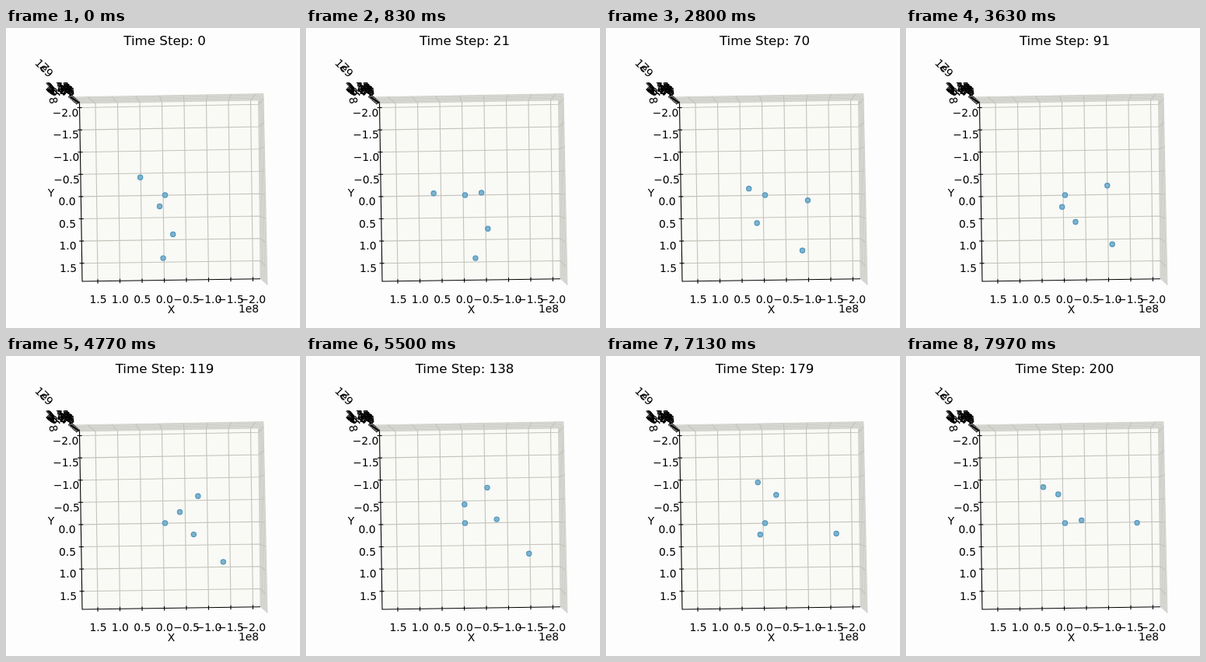
Write an HTML page with a canvas that moves like this. It is 378 px wide and 386 px high and loops after 8 s.

```html
<!DOCTYPE html>
<html lang="en">
<head>
<meta charset="utf-8">
<title>Orbits</title>
<style>
  html, body { margin: 0; width: 100%; height: 100%; overflow: hidden; background: #fdfdfd; }
  canvas { display: block; }
</style>
</head>
<body>
<canvas id="stage" width="378" height="386"></canvas>
<script>
const ctx = document.getElementById('stage').getContext('2d');
const LOOP = 8000, LAST_FRAME = 239, LAST_STEP = 200;
const RAD = Math.PI / 180, GM = 0.0002959122;   // AU^3 / day^2
const TILT = 23.44 * RAD;
const GRID = '#c3c3ba', WALL = '#e2e2de', WALL_LINE = '#c6c6c0';

// Orbital elements at step 0; angles in degrees, lengths in AU.
const planets = [
  { a: 0.3871, e: 0.2056, i: 7.005, L: 69.94, peri: 77.49, node: 48.33 },
  { a: 0.7233, e: 0.0068, i: 3.395, L: 320.68, peri: 131.6, node: 76.68 },
  { a: 1, e: 0.0167, i: 0, L: 100.07, peri: 103, node: 0 },
  { a: 1.5237, e: 0.0934, i: 1.85, L: 77.59, peri: -23.9, node: 49.56 }
];

function keplerPosition({ a, e, i, L, peri, node }, day) {
  const M = (L - peri) * RAD + Math.sqrt(GM / a ** 3) * day;
  let E = M;
  for (let k = 0; k < 20; k++) E = M + e * Math.sin(E);
  const nu = Math.atan2(Math.sqrt(1 - e * e) * Math.sin(E), Math.cos(E) - e);
  const r = a * (1 - e * Math.cos(E));
  const u = nu + (peri - node) * RAD, n = node * RAD, inc = i * RAD;
  const c = Math.cos(u), s = Math.sin(u) * Math.cos(inc);
  return [
    r * (Math.cos(n) * c - Math.sin(n) * s),
    r * (Math.sin(n) * c + Math.cos(n) * s),
    r * Math.sin(u) * Math.sin(inc)
  ];
}

function project([x, y, z]) {
  const right = -x * 56.3;
  const down = (y * Math.cos(TILT) - z * Math.sin(TILT)) * 57;
  return [204.5 + right + 0.012 * down, 215 + down - 0.016 * right];
}

// One day per step: update velocity, then position.
function simulate(planet) {
  const h = 0.01;
  const pos = keplerPosition(planet, 0);
  const before = keplerPosition(planet, -h), after = keplerPosition(planet, h);
  const vel = pos.map((_, k) => (after[k] - before[k]) / (2 * h));
  const path = [];
  for (let step = 0; step <= LAST_STEP; step++) {
    path.push(project(pos));
    const pull = GM / Math.hypot(...pos) ** 3;
    for (let k = 0; k < 3; k++) vel[k] -= pull * pos[k];
    for (let k = 0; k < 3; k++) pos[k] += vel[k];
  }
  return path;
}
const paths = planets.map(simulate);

function polygon(fill, ...points) {
  ctx.beginPath();
  points.forEach(p => ctx.lineTo(...p));
  ctx.closePath();
  ctx.fillStyle = fill;
  ctx.fill();
}

function line(color, width, ...points) {
  ctx.beginPath();
  points.forEach(p => ctx.lineTo(...p));
  ctx.strokeStyle = color;
  ctx.lineWidth = width;
  ctx.stroke();
}

function text(value, x, y, size = 13.89, angle = 0) {
  ctx.save();
  ctx.translate(x, y);
  ctx.rotate(angle * RAD);
  ctx.font = `${size}px "DejaVu Sans", sans-serif`;
  ctx.textAlign = 'center';
  ctx.fillStyle = '#000';
  ctx.fillText(value, 0, 0);
  ctx.restore();
}

const label = v => v.toFixed(1).replace('-', '−');
const mix = (p, q, t) => [p[0] + (q[0] - p[0]) * t, p[1] + (q[1] - p[1]) * t];

function drawAxes() {
  const tl = [94.5, 97], tr = [324.5, 93], br = [327, 322.8], bl = [98, 326];
  const farTL = [83, 89], farTR = [331, 84.5], farBR = [336, 331];
  polygon('#f9f9f6', tl, tr, br, bl);
  polygon(WALL, tl, farTL, farTR, tr);
  polygon(WALL, tr, farTR, farBR, br);

  for (let k = 0; k <= 6; k++) {
    const t = k / 6;
    line(WALL_LINE, 0.7, mix(tl, farTL, t), mix(tr, farTR, t), mix(br, farBR, t));
  }
  for (let k = 0; k < 8; k++) {
    const x = 118 + 28.5 * k, y = 102.5 + 28.6 * k;
    const base = 325.7 - 0.4 * k, left = 94.6 + 0.42 * k;
    const top = [x - 3, 97 - 0.5 * k], right = [324.5 + 0.35 * k, y - 4.2 + 0.15 * k];
    line(GRID, 1.1, [x, base], top, [top[0] - 10 + 2.3 * k, 88.5 - 0.5 * k]);
    line(GRID, 1.1, [left, y], right, [right[0] + 7, right[1] - 7 + 2 * k]);
  }
  line('#000', 1.1, farTL, tl, bl, br);

  for (let k = 0; k < 8; k++) {
    const x = 118 + 28.5 * k, y = 102.5 + 28.6 * k;
    const base = 325.7 - 0.4 * k, left = 94.6 + 0.42 * k;
    line('#000', 1.1, [x, base - 2.5], [x, base + 3]);
    line('#000', 1.1, [left - 3, y], [left + 3, y]);
    text(label(1.5 - k / 2), 118.5 + 28.4 * k, 353.5);
    text(label(k / 2 - 2), 76.5 + 0.5 * k, 113.8 + 28.6 * k);
  }
  text('X', 212.5, 367);
  text('Y', 58, 217);
  text('1e8', 312, 365.5);

  // The depth axis is seen end-on, so its labels pile up.
  for (let k = 0; k < 9; k++) {
    const p = mix([84, 88], [94, 97], k / 8);
    line('#000', 1.1, [p[0] - 4, p[1] + 1], [p[0] + 1, p[1] - 2]);
    text((2.75 - k / 4).toFixed(2), 66 + 0.9 * k, 80 + 0.9 * k);
  }
  text('Z', 46, 54, 13.89, 45);
  text('1e9', 45.5, 55, 13.89, 45);
  text('8', 56, 94, 13.89, 80);
}

function drawDot([x, y]) {
  ctx.beginPath();
  ctx.arc(x, y, 3.1, 0, 2 * Math.PI);
  ctx.fillStyle = '#7db3d0';
  ctx.fill();
  ctx.strokeStyle = '#5096ba';
  ctx.lineWidth = 1.2;
  ctx.stroke();
}

function draw() {
  const frame = Math.min(LAST_FRAME, Math.floor((performance.now() % LOOP + 3.4) * 0.03));
  const step = Math.floor(0.8365 * frame + 0.2);
  ctx.fillStyle = '#fdfdfd';
  ctx.fillRect(0, 0, 378, 386);
  drawAxes();
  drawDot(project([0, 0, 0]));
  paths.forEach(path => drawDot(path[step]));
  text('Time Step: ' + step, 204, 22, 16.67);
  requestAnimationFrame(draw);
}
draw();
</script>
</body>
</html>
```
